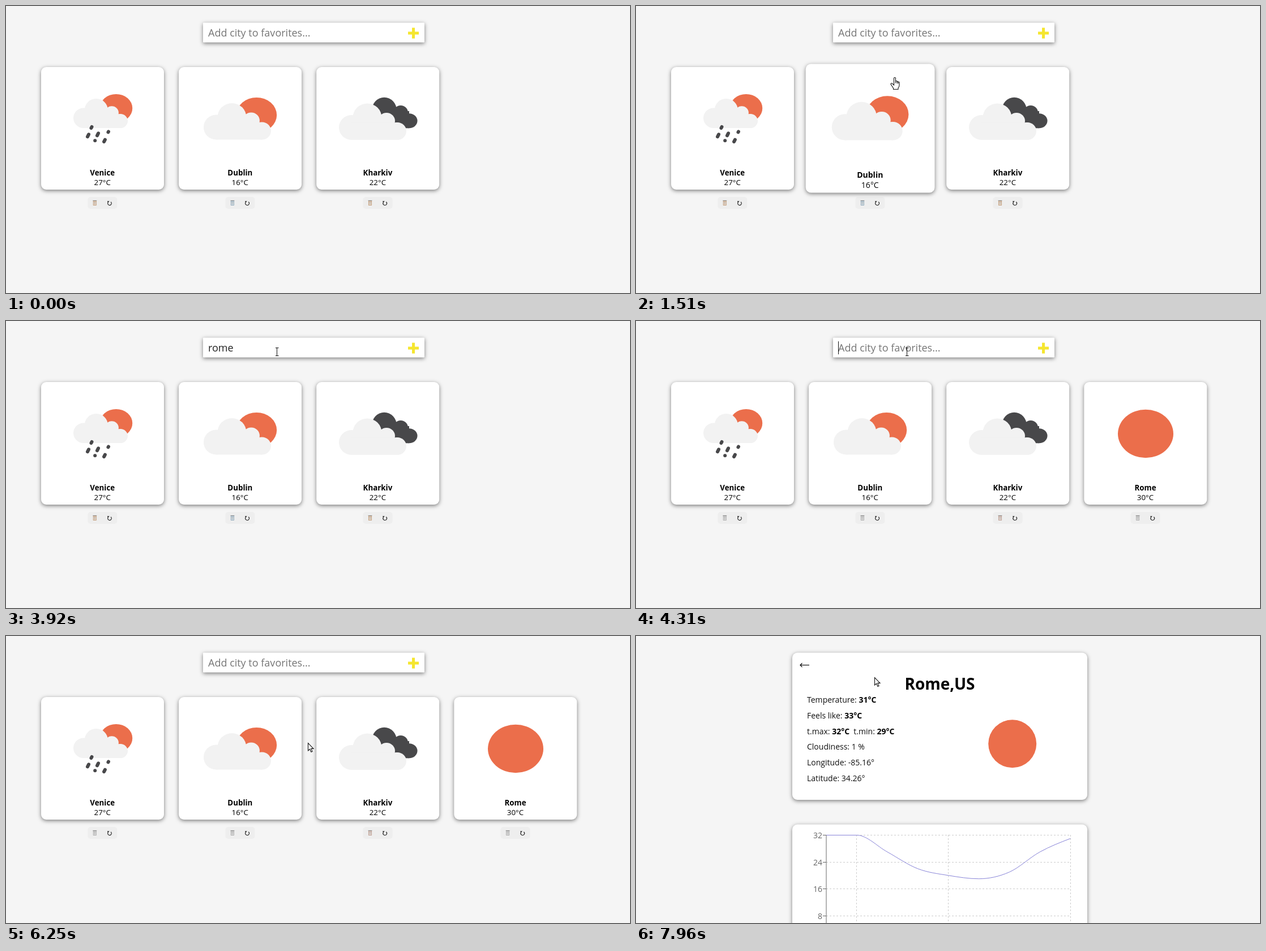
Recreate the animation shown at these times as an HTML page with a canvas. Size 1102 by 508 pixels, loop 8000 ms.

```html
<!DOCTYPE html>
<html lang="en">
<head>
<meta charset="utf-8">
<title>City weather</title>
<style>
  html, body { margin: 0; width: 100%; height: 100%; overflow: hidden; background: #f5f5f5; }
  canvas { display: block; }
</style>
</head>
<body>
<canvas id="stage" width="1102" height="508"></canvas>
<script>
const ctx = document.getElementById('stage').getContext('2d');
const LOOP = 8000, FONT = '"Open Sans", sans-serif';
const SUN = '#eb6e4b', CLOUD = '#f2f2f2', DARK = '#48484a';

// Screen updates: [first, last, count]
const updates = [
  [0, 0, 1], [70, 210, 3], [360, 1130, 11], [1210, 1980, 11], [2210, 2280, 2], [2760, 2760, 1],
  [2970, 3050, 2], [3220, 3220, 1], [3370, 3370, 1], [3920, 3920, 1], [4070, 4070, 1],
  [4240, 4310, 2], [4630, 4630, 1], [4780, 4780, 1], [5100, 5870, 11], [5950, 6710, 11],
  [6790, 7580, 11], [7660, 7960, 5]
];

// Pointer path: [time, x, y, shape]
const path = [
  [0, 554, 488, ''], [70, 554, 488, 'arrow'], [210, 128, 395, 'arrow'], [360, 135, 380, 'arrow'],
  [520, 165, 322, 'hand'], [800, 200, 220, 'hand'], [1000, 281, 180, 'arrow'], [1090, 400, 155, 'hand'],
  [1130, 462, 150, 'hand'], [1500, 456, 123, 'hand'], [1690, 465, 100, 'arrow'], [1860, 482, 64, 'beam'],
  [1980, 482, 55, 'beam'], [2210, 479, 54, 'beam'], [4780, 479, 54, ''], [5100, 470, 68, 'arrow'],
  [5400, 360, 88, 'arrow'], [5640, 289, 135, 'arrow'], [5740, 318, 155, 'hand'], [5790, 353, 161, 'hand'],
  [6110, 520, 185, 'arrow'], [6450, 550, 195, 'hand'], [6580, 765, 198, 'arrow'], [6690, 793, 199, 'arrow'],
  [6870, 835, 199, 'arrow'], [6940, 840, 196, 'hand'], [7250, 845, 170, 'arrow'],
  [7580, 849, 112, 'arrow'], [7740, 690, 42, 'arrow'], [7960, 421, 73, 'arrow']
];

const hovers = [
  { card: 0, from: 520, to: 1000, ramp: 200 },
  { card: 1, from: 1150, to: 1690, ramp: 200 },
  { card: 1, from: 5740, to: 6110, ramp: 560 },
  { card: 2, from: 6450, to: 6580, ramp: 200 },
  { card: 3, from: 6690, to: 7250, ramp: 180 }
];

const cards = [
  { name: 'Venice', temp: '27°C', bin: ['#c29b77', '#aaa'], icon: rainCloud },
  { name: 'Dublin', temp: '16°C', bin: ['#8fa9bb', '#aaa'], icon: () => sunCloud(349, 172, 1) },
  { name: 'Kharkiv', temp: '22°C', bin: ['#c29b77', '#bd9b8e'], icon: darkCloud },
  { name: 'Rome', temp: '30°C', bin: ['#aaa', '#aaa'], icon: () => oval(900, 199.5, 49, 42.7, SUN) }
];

const keys = [[2970, 'r'], [3050, 'ro'], [3220, 'rom'], [3370, 'rome'], [4070, '']];
const PAGE_AT = 7250;
const clamp = v => Math.max(0, Math.min(1, v));

function snap(t) {
  const [start, end, count] = updates.filter(u => u[0] <= t).pop();
  if (count === 1) return start;
  const step = (end - start) / (count - 1);
  return start + step * Math.min(count - 1, Math.floor((t - start + 4) / step));
}

function oval(x, y, rx, ry, color) {
  ctx.fillStyle = color;
  ctx.beginPath();
  ctx.ellipse(x, y, rx, ry, 0, 0, Math.PI * 2);
  ctx.fill();
}

function text(str, x, y, size, { weight = 400, color = '#000', align = 'left' } = {}) {
  ctx.font = `${weight} ${size}px ${FONT}`;
  ctx.textAlign = align;
  ctx.fillStyle = color;
  ctx.fillText(str, x, y);
  return ctx.measureText(str).width;
}

function line(points, color, width = 1) {
  ctx.strokeStyle = color;
  ctx.lineWidth = width;
  ctx.beginPath();
  points.forEach(([x, y]) => ctx.lineTo(x, y));
  ctx.stroke();
}

function panel(x, y, w, h, radius) {
  ctx.save();
  ctx.shadowColor = 'rgba(0,0,0,.5)';
  ctx.shadowBlur = 7;
  ctx.shadowOffsetY = 2;
  ctx.fillStyle = '#fff';
  ctx.beginPath();
  ctx.roundRect(x, y, w, h, radius);
  ctx.fill();
  ctx.restore();
}

function frontCloud() {
  oval(22, 42.5, 22, 22, CLOUD);
  oval(50, 25, 25.5, 25, CLOUD);
  oval(84, 31, 15, 14.5, CLOUD);
  oval(103, 49, 16, 15.5, CLOUD);
  ctx.fillRect(22, 34, 81, 30.5);
}

function sunCloud(x, y, scale) {
  ctx.save();
  ctx.translate(x, y);
  ctx.scale(scale, scale);
  oval(93.5, 21, 35.7, 31, SUN);
  frontCloud();
  ctx.restore();
}

function rainCloud() {
  sunCloud(119, 164, 0.807);
  ctx.lineCap = 'round';
  const drops = [[151, 215, 1], [145, 229.3, 2], [162, 227.3, 2], [180.7, 222.8, 0.5], [157.2, 238.2, 0], [174, 238.4, 1.8]];
  for (const [x, y, r] of drops) line([[x - r * 0.5, y + r], [x + r * 0.5 + 0.01, y - r]], DARK, 6);
  ctx.lineCap = 'butt';
}

function darkCloud() {
  oval(668, 185, 22, 23.3, DARK);
  oval(697, 189, 13, 13, DARK);
  oval(712, 203.3, 14.5, 13, DARK);
  ctx.fillRect(668, 186, 44, 30.3);
  ctx.save();
  ctx.translate(588, 172.5);
  frontCloud();
  ctx.restore();
}

function hoverLevel(index, t) {
  let level = 0;
  for (const { card, from, to, ramp } of hovers) {
    if (card !== index || t < from) continue;
    const peak = clamp((Math.min(t, to) - from) / ramp);
    level = Math.max(level, peak - Math.max(0, t - to) / 200);
  }
  return level;
}

function drawButtons(cx, tint) {
  ctx.fillStyle = '#eee';
  ctx.beginPath();
  ctx.roundRect(cx - 26, 338, 52, 21, 5);
  ctx.fill();
  const x = cx - 13.5;
  line([[x - 3.5, 344.5], [x + 3.5, 344.5]], '#999', 1.2);
  ctx.strokeStyle = tint;
  ctx.lineWidth = 1;
  ctx.strokeRect(x - 2.5, 345.5, 5, 7);
  line([[x - 2, 348.5], [x + 2, 348.5]], '#aaa');
  line([[x, 346], [x, 352]], tint);
  const r = cx + 12.7;
  ctx.strokeStyle = ctx.fillStyle = '#222';
  ctx.lineWidth = 1.1;
  ctx.beginPath();
  ctx.arc(r, 349.3, 3.3, -0.9, Math.PI * 1.22);
  ctx.stroke();
  ctx.beginPath();
  ctx.moveTo(r - 4, 345.2);
  ctx.lineTo(r - 0.3, 345.4);
  ctx.lineTo(r - 3.2, 348.2);
  ctx.fill();
}

function drawCard(card, index, t) {
  const left = 62 + index * 243.1, cx = left + 108.5, cy = 216.5;
  drawButtons(cx - 0.2, card.bin[t < 4070 ? 0 : 1]);
  const scale = 1 + 0.05 * hoverLevel(index, t);
  ctx.save();
  ctx.translate(cx, cy);
  ctx.scale(scale, scale);
  ctx.translate(-cx, -cy);
  panel(left, 108, 217, 217, 9);
  card.icon();
  text(card.name, cx - 0.3, 299.7, 13.333, { weight: 700, align: 'center' });
  text(card.temp, cx - 0.3, 317, 13.333, { align: 'center' });
  ctx.restore();
}

function drawSearch(t) {
  panel(348, 29.5, 391, 35, 1);
  ctx.fillStyle = '#f5e62f';
  ctx.fillRect(710, 45.5, 19, 5);
  ctx.fillRect(717, 38.5, 5, 19);
  const typed = keys.filter(k => k[0] <= t).pop()?.[1] || '';
  const width = typed ? text(typed, 357, 54, 18, { color: '#222' }) : 0;
  if (!typed) text('Add city to favorites...', 357, 54, 18, { color: '#757575' });
  if (t < 2210) return;
  const reset = keys.filter(k => k[0] <= t).pop()?.[0] || 2210;
  if (Math.floor((t - reset) / 550) % 2 === 0) {
    ctx.fillStyle = '#111';
    ctx.fillRect(Math.floor(357 + width), 36, 1, 23);
  }
}

function drawList(t) {
  drawSearch(t);
  cards.slice(0, t < 4240 ? 3 : 4).forEach((card, i) => drawCard(card, i, t));
}

// Monotone cubic through evenly spaced points
function curve(points) {
  const h = points[1][0] - points[0][0], last = points.length - 1;
  const slope = points.slice(1).map((p, i) => (p[1] - points[i][1]) / h);
  const tangent = points.map((p, i) => {
    if (i === 0 || i === last) return 0;
    const a = slope[i - 1], b = slope[i];
    return (Math.sign(a) + Math.sign(b)) * Math.min(Math.abs(a), Math.abs(b), Math.abs(a + b) / 4);
  });
  tangent[0] = (3 * slope[0] - tangent[1]) / 2;
  tangent[last] = (3 * slope[last - 1] - tangent[last - 1]) / 2;
  ctx.beginPath();
  ctx.moveTo(...points[0]);
  for (let i = 0; i < last; i++) {
    const [x, y] = points[i], [u, v] = points[i + 1];
    ctx.bezierCurveTo(x + h / 3, y + tangent[i] * h / 3, u - h / 3, v - tangent[i + 1] * h / 3, u, v);
  }
  ctx.strokeStyle = '#8884d8';
  ctx.lineWidth = 1;
  ctx.stroke();
}

function drawChart() {
  panel(276, 333.5, 521, 260, 9);
  const yOf = v => 352.5 + (32 - v) * 5.94;
  const levels = [32, 24, 16, 8];
  ctx.setLineDash([3, 3]);
  for (const v of levels) {
    const y = Math.floor(yOf(v)) + 0.5;
    line([[336, y], [767, y]], '#ccc');
  }
  for (const x of [389.5, 551.5, 767.5]) line([[x, 352], [x, 508]], '#ccc');
  ctx.setLineDash([]);
  line([[336, 352], [336, 508]], '#666');
  for (const v of levels) {
    const y = Math.floor(yOf(v)) + 0.5;
    line([[330, y], [336, y]], '#666');
    text(v, 329, y + 5, 14, { color: '#666', align: 'right' });
  }
  curve([32, 32, 27, 22, 20, 19, 21, 27, 31].map((v, i) => [336 + i * 53.9, yOf(v)]));
}

function drawDetails() {
  panel(276, 29.5, 521, 260.5, 9);
  line([[290, 51.5], [306, 51.5]], '#111', 1.2);
  line([[293.5, 48], [290, 51.5], [293.5, 55]], '#111', 1.2);
  text('Rome,US', 536.5, 95.3, 28, { weight: 700, align: 'center' });
  const rows = [
    ['Temperature: ', '31°C'], ['Feels like: ', '33°C'], ['t.max: ', '32°C', '\u00a0 t.min: ', '29°C'],
    ['Cloudiness: 1 %'], ['Longitude: -85.16°'], ['Latitude: 34.26°']
  ];
  rows.forEach((row, i) => {
    let x = 302;
    row.forEach((part, j) => {
      x += text(part, x, 118 + i * 27.75, 14, { weight: j % 2 ? 700 : 400, color: j % 2 ? '#000' : '#111' });
    });
  });
  oval(664.7, 190.8, 42.5, 42.5, SUN);
  drawChart();
}

const shapes = {
  arrow: new Path2D('M.5 .5V14L3.6 11.2L5.9 16.3L8 15.4L5.8 10.4H10Z'),
  hand: new Path2D('M-1.5 12V1Q-1.5 -.5 0 -.5Q1.5 -.5 1.5 1V6Q3 4.8 4 6.6Q5.5 5.8 6 7.4Q8 6.8 8 9V13' +
    'Q8 16 6 18V20.5H-2.5V18.5L-7 11.6Q-7.3 9.6 -5 9.8L-1.5 13Z M1.5 6V9.5 M4 6.6V10 M6 7.4V10.5')
};

function drawPointer(t) {
  const i = path.findLastIndex(p => p[0] <= t);
  const [t0, x0, y0, shape] = path[i];
  if (!shape) return;
  const [t1, x1, y1] = path[i + 1] || path[i];
  const k = t1 > t0 ? (t - t0) / (t1 - t0) : 0;
  ctx.save();
  ctx.translate(Math.round(x0 + (x1 - x0) * k), Math.round(y0 + (y1 - y0) * k));
  if (shape === 'beam') {
    line([[-3, -6.5], [-0.5, -6.5], [-0.5, 7.5], [-3, 7.5]], '#111');
    line([[2.5, -6.5], [-0.5, -6.5], [-0.5, 7.5], [2.5, 7.5]], '#111');
  } else {
    ctx.fillStyle = '#fff';
    ctx.strokeStyle = '#111';
    ctx.lineWidth = 1.1;
    ctx.fill(shapes[shape]);
    ctx.stroke(shapes[shape]);
  }
  ctx.restore();
}

function frame(now) {
  const t = snap(now % LOOP);
  ctx.fillStyle = '#f5f5f5';
  ctx.fillRect(0, 0, 1102, 508);
  if (t < PAGE_AT) drawList(t);
  else drawDetails();
  drawPointer(t);
  requestAnimationFrame(frame);
}
requestAnimationFrame(frame);
</script>
</body>
</html>
```
